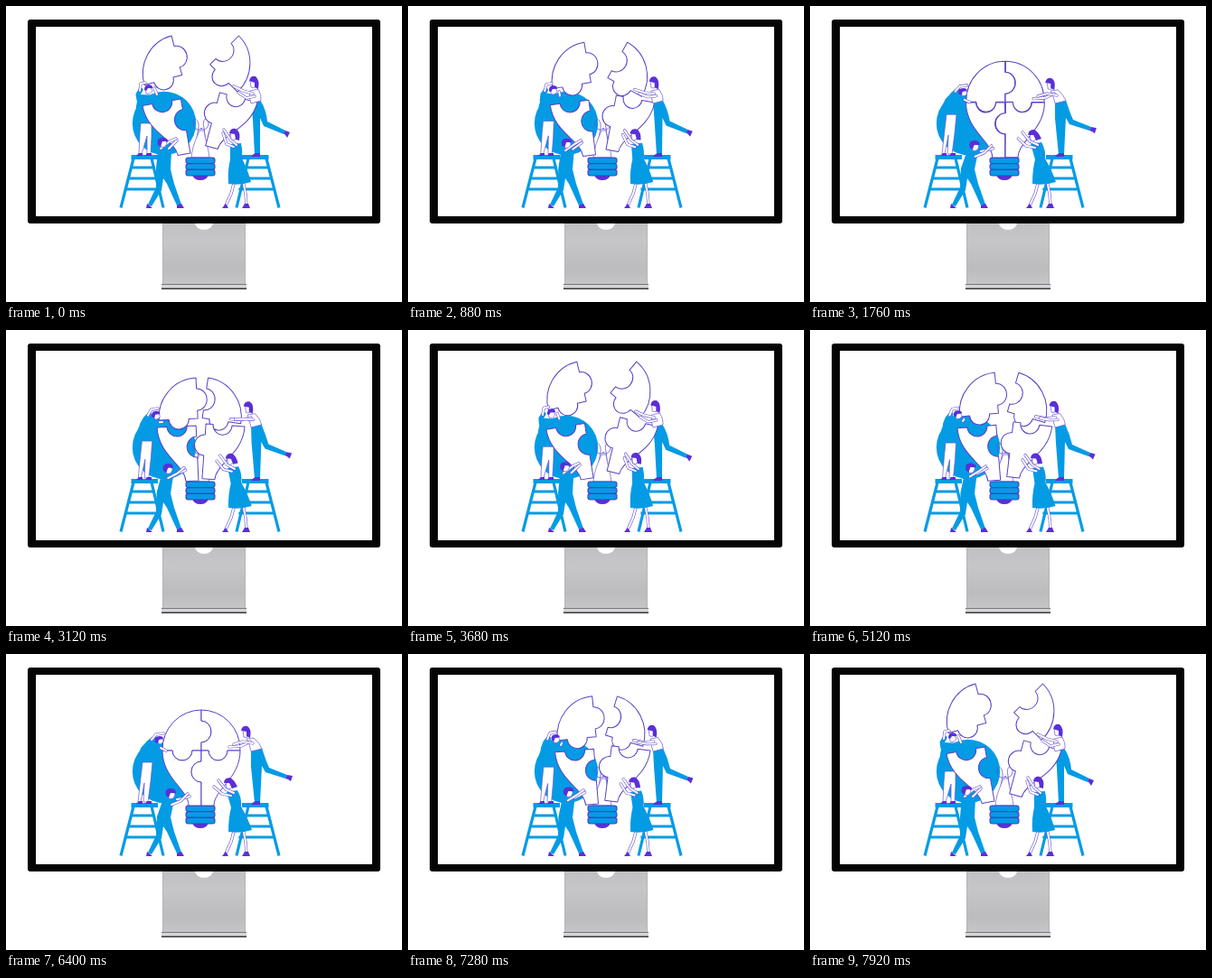
An HTML page for the animation above (8 s loop, 438x328 px).

```html
<!DOCTYPE html>
<html lang="en">
<head>
<meta charset="utf-8">
<title>Puzzle bulb</title>
<style>
  html, body { margin: 0; width: 100%; height: 100%; overflow: hidden; background: #fff; }
  svg { display: block; width: 100vw; height: 100vh; }
  .blue { fill: #049be5; }
  .purple { fill: #5a2fd8; }
  .white { fill: #fff; stroke: #6a55cf; stroke-width: .7; stroke-linejoin: round; }
  .piece { fill: #fff; stroke: #5842c4; stroke-width: 1; stroke-linejoin: round; }
  .wire { fill: none; stroke: #6a55cf; stroke-width: .8; }
  .beam { fill: none; stroke: #049be5; stroke-width: 3.2; }
  .rim, .arm { fill: none; stroke-linecap: round; stroke-linejoin: round; }
  .rim { stroke: #6a55cf; stroke-width: 3.2; }
  .arm { stroke: #fff; stroke-width: 2; }
  .sleeve { fill: none; stroke: #049be5; stroke-width: 5; stroke-linecap: round; stroke-linejoin: round; }
</style>
</head>
<body>
<svg id="stage" viewBox="0 0 438 328">
  <defs>
    <linearGradient id="metal" x2="0" y2="1">
      <stop offset="0" stop-color="#c0c0c2"/>
      <stop offset=".3" stop-color="#c6c6c8"/>
      <stop offset=".75" stop-color="#bcbcbe"/>
      <stop offset="1" stop-color="#c6c6c8"/>
    </linearGradient>
  </defs>
  <rect width="438" height="328" fill="#fff"/>
  <rect x="173" y="240" width="92" height="69" fill="url(#metal)"/>
  <path d="M173.5 240V309M264.5 240V309" stroke="#b4b4b6"/>
  <path d="M209 240A10 8 0 0 0 229 240Z" fill="#fff"/>
  <path d="M172 308H266V314H172Z" fill="#d6d6d8"/>
  <path d="M172 308.500H266" stroke="#77777a"/>
  <path d="M172 313.300H266" stroke="#38383a" stroke-width="1.4"/>
  <rect x="24" y="15" width="390" height="226" rx="3" fill="#050505"/>
  <rect x="33" y="23" width="372" height="210" fill="#fff"/>
</svg>
<script>
const stage = document.getElementById('stage');
const CYCLE = 4000, STEP = 80;
const moving = [];

function add(tag, cls, attrs = {}) {
  const el = document.createElementNS('http://www.w3.org/2000/svg', tag);
  el.setAttribute('class', cls);
  for (const key in attrs) el.setAttribute(key, attrs[key]);
  return stage.appendChild(el);
}

const still = (cls, d) => add('path', cls, { d });
const numbers = /-?\d+(\.\d+)?/g;

// Blends two paths that share the same commands.
function mix(a, b, p) {
  const ends = b.match(numbers);
  let i = 0;
  return a.replace(numbers, n => +(+n + (ends[i++] - n) * p).toFixed(2));
}

function morph(cls, closed, open) {
  const el = still(cls, closed);
  moving.push(p => el.setAttribute('d', mix(closed, open, p)));
}

function limb(closed, open) {
  morph('rim', closed, open);
  morph('arm', closed, open);
}

// Lifts first, then swings sideways; bend sets how late the swing comes.
function piece(d, dx, dy, turn, ax, ay, bend) {
  const el = still('piece', d);
  moving.push(p => {
    const swing = p * (1 - bend + bend * p);
    el.setAttribute('transform', `translate(${dx * swing} ${dy * p}) rotate(${turn * swing} ${ax} ${ay})`);
  });
}

function ladder(transform) {
  const rungs = [179, 191, 203].map((y, i) => `M${138 - i * 3.3} ${y}H${165 + i * 3.3}`).join('');
  add('path', 'beam', { d: 'M141 169L127 223.500M161 169L174 223.500' + rungs, transform });
  add('path', 'blue', { d: 'M138.500 165H168V170H138.500Z', transform });
}

// Blue backdrop and ladders
add('circle', 'blue', { cx: 175, cy: 130, r: 35.2 });
ladder('');
ladder('translate(429 0) scale(-1 1)');

// Bulb base and filament
still('wire', 'M207 168L213 135C214 126 207 121 207 130C207 137 214 139 217 135M223 168L219 135C216 125 224 120 224 130C224 136 218 139 215 135');
still('white', 'M205 168C206 155 211 146 214 138L219 138C220 148 224 157 225 168Z');
still('purple', 'M206 187H224Q222 193 215 193Q208 193 206 187Z');
[168, 174.7, 181.4].forEach(y => add('rect', 'blue', {
  x: 199, y, width: 32, height: 6.6, rx: 2.5, stroke: '#4a3cc0', 'stroke-width': 1.1
}));

// Upper left man, body
morph('blue', 'M166 91L150 103Q144 112 147 126L165 126L173 101Z', 'M148 98L145 106Q142 116 145 130L163 130L168 99Z');
morph('white', 'M151 120L162 120L160 141L157 164L152 164L153 143L149 164L146 164L149 137Z',
               'M149 130L161 130L161 145L160 164L156 164L156 144L150 164L147 164L148 142Z');
still('purple', 'M144 166L147 163H151V166ZM154 166L156 163H161V166Z');

// Upper right woman, lower body
morph('blue', 'M271 105L283 104Q287 117 291 126L311 134L309 138L287 131L283 124L281 165L275 165L271 125Z',
              'M271 106L281 104Q288 115 289 128L309 138L307 142L285 133L281 124L281 165L275 165L273 126Z');
morph('purple', 'M311 134L317 135L315 141L312 139L309 138Z', 'M309 138L314 140L311 146L309 143L307 141Z');
still('purple', 'M271 167Q273 164 276 163H281V167Z');

// Bulb pieces
piece('M216 62A43 44 0 0 0 173 107H184A11 11 0 0 0 206 107H216V98A11 12 0 0 0 216 74Z', -33, -29, -15, 216, 62, .6);
piece('M216 62V74A11 12 0 0 1 216 98V107H224A10.500 11 0 0 0 245 107H259A43 44 0 0 0 216 62Z', 41.5, -29, 45, 216, 62, .6);
piece('M173 107H184A11 11 0 0 0 206 107H216V119A11 11.500 0 0 0 216 142V168H202C202 150 173 138 173 107Z', -22, 3.5, -10, 173, 107, .2);
piece('M216 107H224A10.500 11 0 0 0 245 107H259C259 138 230 150 230 168H216V142A11 11.500 0 0 1 216 119Z', 19, 0, 15, 259, 107, .2);

// Upper left man, head and arms
morph('sleeve', 'M152 105L158 98L163 94', 'M147 104L146 98L149 93');
limb('M161 95L166 89L174 88', 'M148 94L149 86L154 85');
limb('M171 104L177 107', 'M167 98L164 91');
morph('white', 'M168 93Q174 92 174 97Q172 101 168 99Z', 'M154 91Q161 89 162 94Q159 99 155 97Z');
morph('purple', 'M165 98Q163 91 170 91Q174 91 174 94L169 95L168 99Z', 'M153 93Q153 87 158 87Q163 88 162 91L157 91L155 94Z');

// Upper right woman, torso, arms, head
morph('white', 'M266 94L274 93Q281 99 283 105L271 108Q270 101 266 94Z', 'M270 94L279 92Q283 99 282 105L271 108Q268 101 270 94Z');
limb('M270 97L260 102L247 103', 'M273 97L262 94L252 89');
limb('M273 99L262 97L252 100', 'M275 100L266 102L257 96');
morph('white', 'M262 84Q268 82 269 88Q268 94 263 92Z', 'M270 83Q276 81 278 86Q276 92 271 90Z');
morph('purple', 'M260 85Q261 79 267 80Q272 83 270 93L266 91L266 86Z', 'M269 83Q270 77 276 78Q281 82 279 92L275 90L275 85Z');

// Lower left man
morph('blue', 'M174 160Q182 157 186 162L182 181L186 197L194 220L189 221L178 197L174 191L172 204L161 222L157 220L166 201L167 180Z',
              'M168 158Q177 154 183 160L182 181L186 197L194 220L189 221L178 197L174 191L172 204L161 222L157 220L166 201L166 180Z');
still('purple', 'M156 219L162 224H155ZM189 221L194 219L197 224H189Z');
morph('sleeve', 'M174 163L182 165L189 161', 'M170 161L178 162L182 157');
limb('M189 161L196 160L203 158', 'M180 158L185 153L189 149');
limb('M183 167L193 163L201 155', 'M171 158L181 150L188 147');
morph('white', 'M179 153Q186 151 187 156Q185 162 180 160Z', 'M170 149Q177 147 178 152Q176 158 171 156Z');
morph('purple', 'M177 157Q175 149 182 149Q188 149 188 154L182 154L180 159Z', 'M168 154Q166 146 173 146Q179 146 179 150L173 150L171 156Z');

// Lower right woman
still('rim', 'M253 193L249 208L243 221M262 193L265 208L266 221');
still('arm', 'M253 193L249 208L243 221M262 193L265 208L266 221');
still('purple', 'M239 224L243 219L246 224ZM261 224L264 219H268L270 224Z');
morph('blue', 'M244 153L256 151Q261 160 260 169Q268 183 272 195Q260 199 246 197Q246 182 249 170Z',
              'M248 153L260 152Q262 160 261 169Q268 183 271 195Q259 199 246 197Q245 182 248 170Z');
limb('M249 157L239 155L230 147', 'M252 156L244 153L240 141');
limb('M252 154L243 150L235 140', 'M255 154L248 148L241 137');
morph('white', 'M243 141Q250 139 251 145Q249 151 244 149Z', 'M248 139Q255 137 256 143Q254 150 249 148Z');
morph('purple', 'M241 143Q241 137 248 137Q252 139 256 147L250 149L247 143Z', 'M247 141Q248 135 254 136Q260 139 258 149L254 148L253 142Z');

function ease(x) {
  x = Math.min(1, Math.max(0, x));
  return x < .5 ? 2 * x * x : 1 - 2 * (1 - x) ** 2;
}

// 1 is fully apart, 0 is fully joined.
function spread(t) {
  return t < 2200 ? 1 - ease((t - 300) / 1650) : ease((t - 2590) / 1350);
}

function frame(now) {
  const t = Math.floor(now / STEP) * STEP % CYCLE;
  const p = spread(t);
  moving.forEach(update => update(p));
  requestAnimationFrame(frame);
}
frame(0);
</script>
</body>
</html>
```
